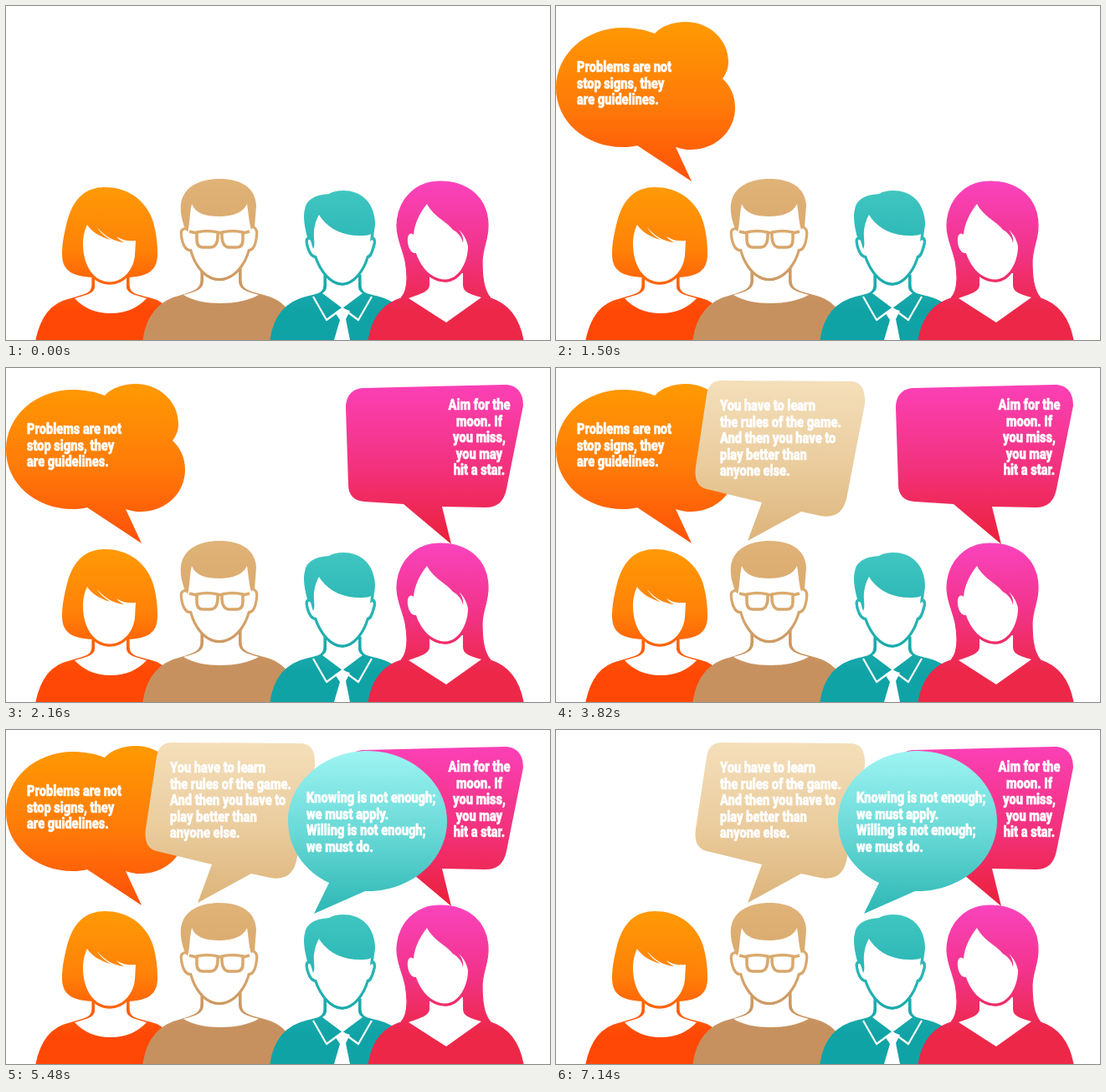
Animation, 650 px wide and 400 px high, one loop 8000 ms. Source, as an HTML page:

```html
<!DOCTYPE html>
<html lang="en">
<head>
<meta charset="utf-8">
<title>Four voices</title>
<style>
  html, body { margin: 0; width: 100%; height: 100%; overflow: hidden; background: #fff; }
  svg { display: block; width: 100%; height: 100%; }
  text { font: 900 17.5px Roboto, "Open Sans", sans-serif; fill: #fff; stroke: #fff; stroke-width: 0.6; }
</style>
</head>
<body>
<svg id="stage" viewBox="0 0 650 400"></svg>
<script>
const LOOP = 8000;
const LINE = 19.6;
const CONDENSE = 0.835;
const stage = document.getElementById('stage');

function add(parent, tag, attrs, text) {
  const el = document.createElementNS('http://www.w3.org/2000/svg', tag);
  for (const key in attrs) el.setAttribute(key, attrs[key]);
  if (text) el.textContent = text;
  return parent.appendChild(el);
}

const defs = add(stage, 'defs', {});

// Vertical gradient between two heights, returned as a paint.
function shade(id, y1, y2, ...colors) {
  const g = add(defs, 'linearGradient',
    { id, gradientUnits: 'userSpaceOnUse', x1: 0, x2: 0, y1, y2 });
  colors.forEach((c, i) => add(g, 'stop', { offset: i / (colors.length - 1), 'stop-color': c }));
  return `url(#${id})`;
}

const people = [
  {
    paint: shade('orange', 217, 365, '#ff9a05', '#ff8208', '#ff4805'),
    body: 'M36 400C42 372 54 356 76 351C96 346 103 344 103 334V322H147V334C147 344 154 346 172 350C190 354 200 366 205 400Z',
    neck: 'M106 322V336C106 343 98 346 82 350C92 361 106 368 125 368C144 368 158 361 168 350C152 346 144 343 144 336V322Z',
    hair: 'M118 217C95 217 80 231 73 258C69 274 67 285 67 297C67 317 79 324 104 325H146C169 324 181 317 181 297C181 285 180 274 176 259C167 231 144 217 118 217Z',
    face: 'M97 262C102 270 113 277 125 280C118 276 112 271 109 265C118 276 129 282 141 283C137 281 134 279 132 276C140 281 147 282 155 281L154 298C153 315 140 330.500 124 330.500C106 330.500 92 312 92 285C92 276 94 268 97 262Z'
  },
  {
    paint: shade('tan', 207, 355, '#e0b378', '#d9a86c', '#c6915f'),
    body: 'M164 400C168 372 182 353 208 347C226 342 233 339 233 328V314H281V328C281 339 288 342 306 346C328 351 343 362 348 400Z',
    neck: 'M236 314V329C236 339 228 342 212 346C224 353 239 356 256 356C273 356 289 353 302 346C286 342 278 339 278 329V314Z',
    hair: 'M214 267C210 256 208 247 209 237C212 216 232 207 255 207C280 207 298 217 299 239L297 265C303 266 301 277 299 284C297 292 294 294 290 294C286 313 271 329 255 329C239 329 225 313 220 294C215 294 212 290 210 284C207 275 207 266 214 267Z',
    face: 'M222 237C226 248 238 252 255 252C271 252 284 247 288 237C290 249 290 258 293 268C293 265 299 266 298 274C297 284 295 291 289 291C284 311 270 326 255 326C240 326 227 311 222 291C215 292 212 283 211 274C210 267 216 267 217 271C220 260 219 249 222 237Z',
    glasses: 'M219 270L228 272M291 270L283 272M228 271Q240 268 253 271Q254 289 244 289H235Q228 289 228 280ZM283 271Q271 268 258 271Q257 289 267 289H276Q283 289 283 280ZM253 272Q255.500 271 258 272'
  },
  {
    paint: shade('teal', 221, 365, '#40c6c1', '#29b5b4', '#10a3a6'),
    body: 'M316 400C320 371 334 354 360 348C375 345 380 343 380 334V322H424V334C424 343 429 345 444 348C470 354 485 374 487 400Z',
    neck: 'M383 322V336C383 340 381 342 378 344L402 362L426 344C423 342 421 340 421 336V322Z',
    hair: 'M360 277C356 262 355 251 357 244C358 233 368 226 386 225C391 222 396 221 403 221C426 221 441 237 441 262L439 276C444 279 442 286 439 294C437 300 435 302 433 302C427 320 415 334.500 402 334.500C388 334.500 375 319 369 302C364 301 361 296 359 289C357 282 357 278 360 277Z',
    face: 'M374 250C384 267 404 276 426 275C431 275 434 274 436 273L435 282C438 278 440 281 438 286C436 294 434 299 431 299C426 317 414 331.500 402 331.500C389 331.500 377 317 371 299C367 299 364 295 362 288C360 281 361 278 364 281L367 291C370 285 367 278 368 269C369 261 371 255 374 250Z',
    collar: 'M367 348L383 376L402 362L421 376L437 348',
    tie: 'M402 362L411 365L406 375L411 400H392L399 376L393 367Z'
  },
  {
    paint: shade('pink', 210, 365, '#fa43bd', '#f2348c', '#ed2748'),
    body: 'M433 400C438 371 452 356 472 350C481 340 480 322 477 305C473 288 467 278 467 263C468 231 490 210 519 210C553 210 576 231 576 263C576 280 570 288 569 305C569 322 570 339 579 350C601 357 613 374 618 400Z',
    neck: 'M506 320V334C506 342 495 345 481 350L526 379L568 349C553 345 546 342 546 334V320Z',
    hair: 'M487 293C493 314 508 330.500 525 330.500C542 330.500 553 311 554 288L540 270L503 245Z',
    face: 'M503 237C511 252 526 258 534 268C541 272 545 278 546 284C547 278 545 273 541 268C547 273 551 281 552 288C552 308 540 327.500 525 327.500C509 327.500 496 314 490 296C485 297 481 291 480 283C479 274 483 270 487 274C488 260 495 247 503 237Z'
  }
];

// Bubbles in stacking order; from/to are loop times in ms.
const bubbles = [
  {
    from: 500, to: 7140, x: 25, y: 79,
    paint: shade('orangeTalk', 19, 210, '#ff9a02', '#ff7c08', '#ff5008'),
    shape: 'M118 33C105 28 93 26 80 26C35 26 0 58 0 98C0 138 35 169 80 169C86 169 92 168.500 97 167L162 210L143 169C150 171.500 157 172.500 163 172C192 171 214 149 214 122C214 107 208 95 199 87C204 80 206 74 206 67C206 40 183 19 155 19C140 19 126 24 118 33Z',
    lines: ['Problems are not', 'stop signs, they', 'are guidelines.']
  },
  {
    from: 2160, to: LOOP, x: 565.5, y: 50, anchor: 'middle',
    paint: shade('pinkTalk', 20, 211, '#fb40b6', '#f3327f', '#eb2038'),
    shape: 'M428 24L596 20C610 20 618 29 618 45L598 145C595 160 587 167 573 167L521 166L532 211L475 163L428 160C416 159 409 152 409 140L406 48C406 33 414 24 428 24Z',
    lines: ['Aim for the', 'moon. If', 'you miss,', 'you may', 'hit a star.']
  },
  {
    from: 3820, to: LOOP, x: 196, y: 51,
    paint: shade('tanTalk', 15, 207, '#f4dfba', '#ebcd9f', '#dcb47a'),
    shape: 'M198 15L352 16C364 16 370 25 369 43L347 157C343 173 333 180 316 177L293 172L229 207L246 161L180 145C169 142 165 133 167 118L180 32C182 20 188 15 198 15Z',
    lines: ['You have to learn', 'the rules of the game.', 'And then you have to', 'play better than', 'anyone else.']
  },
  {
    from: 5480, to: LOOP, x: 359, y: 87,
    paint: shade('tealTalk', 25, 220, '#9df4f2', '#69d9d7', '#2cb7b4'),
    shape: 'M432 25C484 25 527 63 527 109C527 156 484 194 429 193L368 220L386 183C356 169 337 141 337 109C337 63 380 25 432 25Z',
    lines: ['Knowing is not enough;', 'we must apply.', 'Willing is not enough;', 'we must do.']
  }
];

function drawPerson(p) {
  const fill = (d, color) => d && add(stage, 'path', { d, fill: color });
  const line = (d, color, width) => d && add(stage, 'path',
    { d, fill: 'none', stroke: color, 'stroke-width': width, 'stroke-linejoin': 'round' });
  fill(p.body, p.paint);
  line(p.body, p.paint, 1.2);
  fill(p.neck, '#fff');
  fill(p.hair, p.paint);
  line(p.face, p.paint, 6.4);
  fill(p.face, '#fff');
  line(p.glasses, p.paint, 3.6);
  line(p.collar, '#fff', 2.2);
  fill(p.tie, '#fff');
}

function drawBubble(b) {
  b.group = add(stage, 'g', {});
  add(b.group, 'path', { d: b.shape, fill: b.paint });
  b.lines.forEach((words, i) => add(b.group, 'text', {
    transform: `translate(${b.x} ${b.y + i * LINE}) scale(${CONDENSE} 1)`,
    'text-anchor': b.anchor || 'start'
  }, words));
}

people.forEach(drawPerson);
bubbles.forEach(drawBubble);

function render(time) {
  const t = time % LOOP;
  for (const b of bubbles) {
    b.group.setAttribute('visibility', t >= b.from && t < b.to ? 'visible' : 'hidden');
  }
}

const start = performance.now();
function tick() {
  render(performance.now() - start);
  requestAnimationFrame(tick);
}
tick();
</script>
</body>
</html>
```
